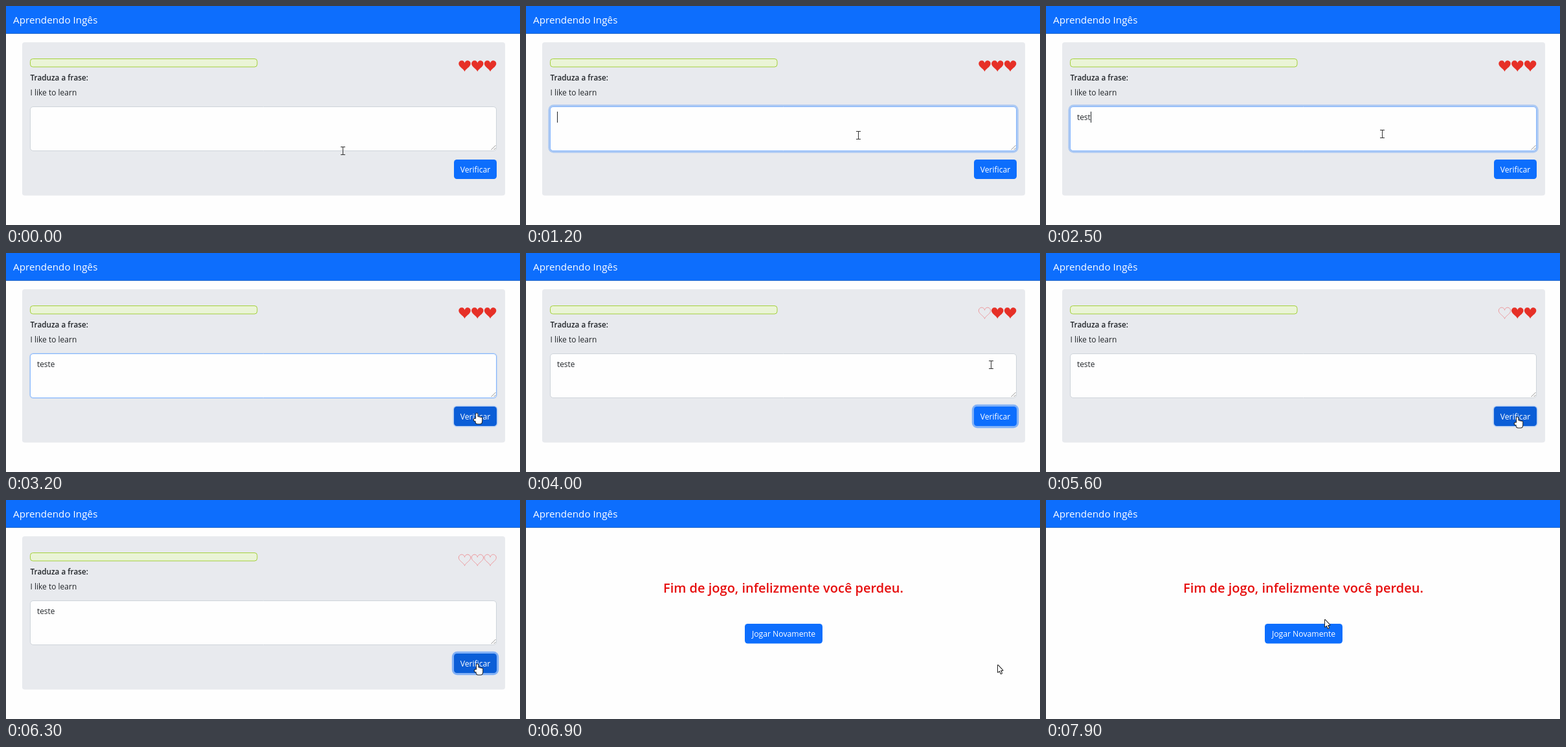
An HTML page with a canvas that plays this animation: 794x338 px, repeating every 8 s.

```html
<!DOCTYPE html>
<html lang="pt">
<head>
<meta charset="utf-8">
<title>Aprendendo Ingês</title>
<style>
html, body { margin: 0; width: 100%; height: 100%; overflow: hidden; background: #fefefe; }
canvas { display: block; width: 794px; height: 338px; }
</style>
</head>
<body>
<canvas id="stage" width="794" height="338"></canvas>
<script>
const ctx = document.getElementById('stage').getContext('2d');
const LOOP = 8000, TICK = 100, GAME_OVER = 6900;
const BLUE = '#0d6efd', INK = '#212529', PAGE = '#fefefe';

const field = { x: 37.5, y: 155.5, w: 720, h: 68 };
const verify = { x: 692, y: 237, w: 66, h: 30, label: 'Verificar' };
const replay = { x: 338, y: 191, w: 120, h: 30.5, label: 'Jogar Novamente' };

const fieldClick = 850, clicks = [3125, 5525, 6025];
const moves = [
  { from: 0, to: 600, x: 513, y: 199 },
  { from: 1200, to: 1600, x: 519, y: 197 },
  { from: 2600, to: 3000, x: 727, y: 247 },
  { from: 3500, to: 4400, x: 712, y: 118 },
  { from: 5000, to: 5400, x: 728, y: 253 },
  { from: GAME_OVER, to: 7900, x: 430, y: 183 }
];

const clamp = v => Math.max(0, Math.min(1, v));
const ease = k => k * k * (3 - 2 * k);
const fade = (t, from, to) => clamp((t - from) / 150) - clamp((t - to) / 150);
const inside = (p, r) => p.x >= r.x && p.x <= r.x + r.w && p.y >= r.y && p.y <= r.y + r.h;

const arrow = new Path2D('M1 2V12.8L3.6 10.5 5.7 15 7 14.4 5 9.9H8.4Z');
const hand = makeHand(), heart = makeHeart();

function makeHand() {
  const path = new Path2D();
  path.roundRect(-1, 0.5, 2.4, 12, 1.2);
  for (let i = 1; i < 4; i++) path.roundRect(-1 + i * 2.3, 5 + i * 0.6, 2.3, 7, 1.1);
  path.roundRect(-1.4, 8.5, 9.4, 8, 3);
  path.roundRect(-4.2, 8.8, 4, 3.4, 1.6);
  return path;
}

function makeHeart() {
  const path = new Path2D();
  for (let a = 0; a < 2 * Math.PI; a += 0.1) {
    const y = 13 * Math.cos(a) - 5 * Math.cos(2 * a) - 2 * Math.cos(3 * a) - Math.cos(4 * a);
    path.lineTo(9.2 * Math.sin(a) ** 3, -0.6 * y - 1.2);
  }
  path.closePath();
  return path;
}

function pointerAt(t) {
  let x = 520, y = 223;
  for (const m of moves) {
    const k = ease(clamp((t - m.from) / (m.to - m.from)));
    x += (m.x - x) * k;
    y += (m.y - y) * k;
  }
  return { x: Math.round(x), y: Math.round(y) };
}

function text(str, x, y, size, color = INK, weight = 400, align = 'left') {
  ctx.font = `${weight} ${size}px "Open Sans", "Noto Sans", sans-serif`;
  ctx.textAlign = align;
  ctx.fillStyle = color;
  ctx.fillText(str, x, y);
}

function box({ x, y, w, h }, r, fill, stroke) {
  ctx.beginPath();
  ctx.roundRect(x, y, w, h, r);
  ctx.fillStyle = fill;
  ctx.fill();
  if (stroke) {
    ctx.lineWidth = 1;
    ctx.strokeStyle = stroke;
    ctx.stroke();
  }
}

function ring({ x, y, w, h }, p, rgb, alpha) {
  if (p <= 0) return;
  const s = 3.2 * p;
  box({ x: x - s, y: y - s, w: w + 2 * s, h: h + 2 * s }, 5 + s, `rgba(${rgb},${alpha * p})`);
}

function button(b, hover, focus) {
  ring(b, focus, '49,132,253', 0.55);
  box(b, 4.5, hover ? '#0b5ed7' : BLUE);
  text(b.label, b.x + b.w / 2, b.y + 20, 12.2, '#fff', 400, 'center');
}

function drawHeart(x, full) {
  ctx.save();
  ctx.translate(x, 92.5);
  if (full) {
    ctx.fillStyle = '#e63027';
    ctx.fill(heart);
  } else {
    ctx.lineWidth = 0.9;
    ctx.strokeStyle = '#ee8f93';
    ctx.stroke(heart);
  }
  ctx.restore();
}

function drawField(t) {
  const focus = fade(t, fieldClick, clicks[0]);
  ring(field, focus, '13,110,253', 0.27);
  box(field, 4.5, PAGE, focus > 0.3 ? '#86b7fe' : '#ced4da');

  ctx.beginPath();
  for (const d of [3, 7]) {
    ctx.moveTo(756.5 - d, 222);
    ctx.lineTo(756.5, 222 - d);
  }
  ctx.lineWidth = 0.8;
  ctx.strokeStyle = '#777';
  ctx.stroke();

  const typed = 'teste'.slice(0, clamp((t - 2100) / 500) * 5);
  text(typed, 48, 175.5, 11.9);
  const blinkOn = (t - 900) % 1000 < 500 || typed;
  if (t > fieldClick && t < clicks[0] && blinkOn) {
    ctx.fillRect(48 + Math.round(ctx.measureText(typed).width), 163, 1, 17);
  }
}

function drawQuiz(t, p) {
  box({ x: 25, y: 56, w: 746, h: 236.5 }, 4, '#e8eaee');
  box({ x: 37.5, y: 81.5, w: 350.5, h: 12.5 }, 4, '#eaf4d6', '#a4d03c');
  text('Traduza a frase:', 37.5, 115, 11.75, INK, 600);
  text('I like to learn', 37.5, 138, 12);
  clicks.forEach((click, i) => drawHeart(708.5 + i * 19.8, t < click + 175));
  drawField(t);
  button(verify, inside(p, verify), fade(t, clicks[0], 4200) + fade(t, clicks[1], LOOP));
}

function drawGameOver(p) {
  text('Fim de jogo, infelizmente você perdeu.', 397.5, 143, 20, '#e60c0c', 600, 'center');
  button(replay, inside(p, replay), 0);
}

function drawPointer(p, kind) {
  ctx.save();
  ctx.translate(p.x, p.y);
  if (kind === 'beam') {
    ctx.fillStyle = '#333';
    ctx.fillRect(0, -6, 1, 13);
    for (const y of [-6, 6]) ctx.fillRect(-3, y, 7, 1);
  } else {
    const shape = kind === 'hand' ? hand : arrow;
    ctx.lineWidth = 2;
    ctx.lineJoin = 'round';
    ctx.strokeStyle = '#222';
    ctx.stroke(shape);
    ctx.fillStyle = '#fff';
    ctx.fill(shape);
  }
  ctx.restore();
}

function draw(t) {
  const p = pointerAt(t), over = t >= GAME_OVER;
  ctx.fillStyle = PAGE;
  ctx.fillRect(0, 0, 794, 338);
  ctx.fillStyle = BLUE;
  ctx.fillRect(0, 0, 794, 42);
  ctx.fillStyle = '#2a6cc8';
  ctx.fillRect(0, 42, 794, 1);
  text('Aprendendo Ingês', 11, 27, 15.25, '#fff');
  if (over) drawGameOver(p);
  else drawQuiz(t, p);

  let kind = 'arrow';
  if (inside(p, over ? replay : verify)) kind = 'hand';
  else if (!over && inside(p, field)) kind = 'beam';
  drawPointer(p, kind);
}

const start = performance.now();
function loop() {
  const t = (performance.now() - start) % LOOP;
  draw(Math.floor(t / TICK) * TICK);
  requestAnimationFrame(loop);
}
loop();
</script>
</body>
</html>
```
